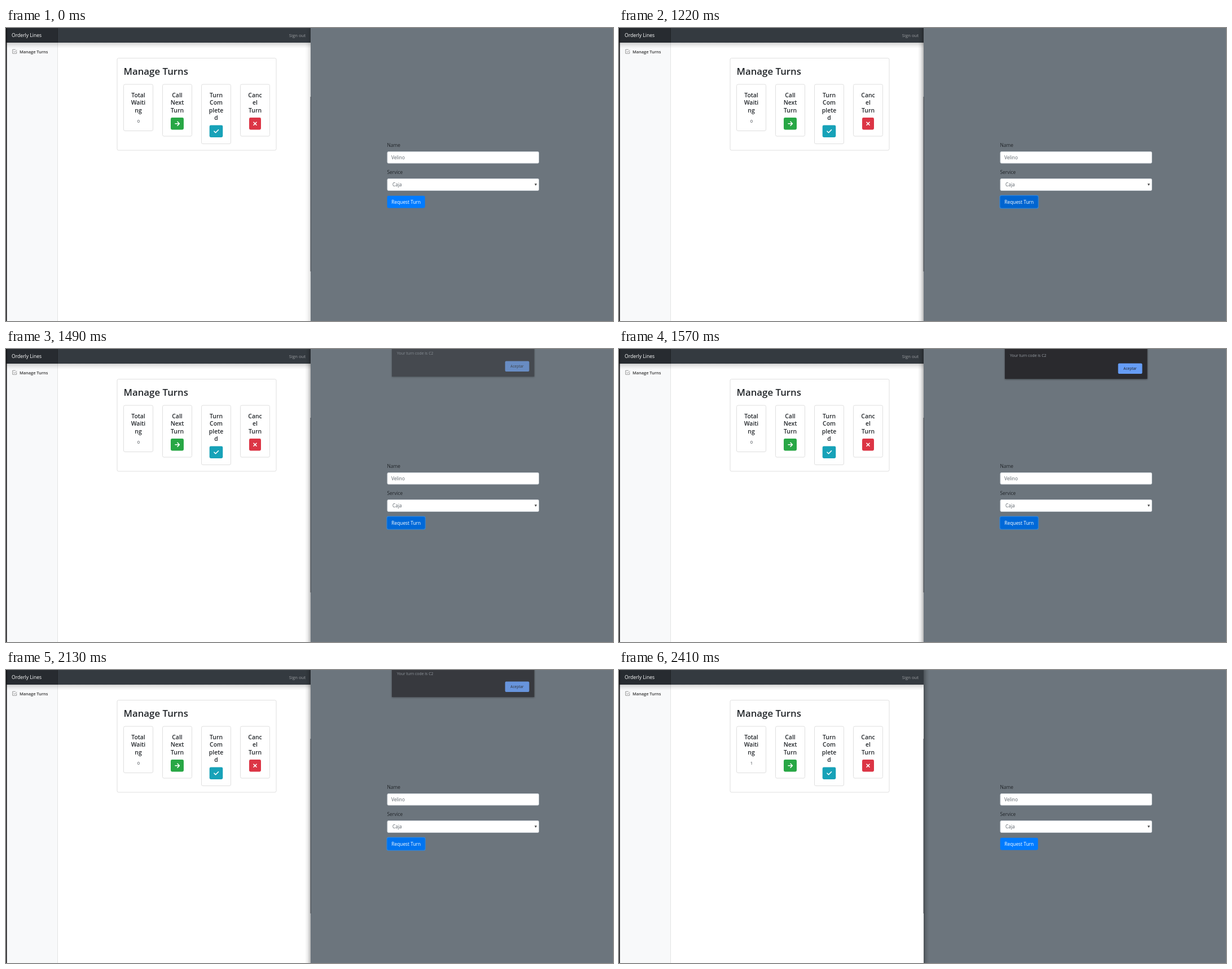
An HTML page that plays this animation: 1076x520 px, repeating every 2.83 s.

```html
<!DOCTYPE html>
<html lang="en">
<head>
<meta charset="utf-8">
<title>Turn desk</title>
<style>
  html, body { margin: 0; width: 100%; height: 100%; overflow: hidden; background: #6c757d; }
  svg { display: block; font: 8.4px "Open Sans", "Noto Sans", sans-serif; }
  .card { fill: #fff; stroke: #dfdfdf; }
  .title { font-size: 10.4px; font-weight: 600; fill: #212529; }
  .mid { text-anchor: middle; }
  .icon { fill: none; stroke: #fff; stroke-width: 1.6; stroke-linecap: round; stroke-linejoin: round; }
  .field { fill: #fff; stroke: #ced4da; }
  .label { fill: #212529; }
  .value { fill: #5b636a; }
</style>
</head>
<body>
<svg width="1076" height="520" viewBox="0 0 1076 520">
  <defs>
    <linearGradient id="navShade" x2="0" y2="1">
      <stop stop-opacity=".17"/><stop offset=".5" stop-opacity=".07"/><stop offset="1" stop-opacity="0"/>
    </linearGradient>
    <linearGradient id="toLeft" x1="1" x2="0">
      <stop stop-opacity=".28"/><stop offset=".5" stop-opacity=".08"/><stop offset="1" stop-opacity="0"/>
    </linearGradient>
    <linearGradient id="toRight">
      <stop stop-opacity=".3"/><stop offset=".5" stop-opacity=".1"/><stop offset="1" stop-opacity="0"/>
    </linearGradient>
    <filter id="drop" x="-5%" y="-20%" width="110%" height="150%">
      <feDropShadow dx="0" dy="1" stdDeviation="1.5" flood-opacity=".45"/>
    </filter>
  </defs>

  <!-- Desk window -->
  <rect width="540" height="520" fill="#fff"/>
  <rect y="26" width="91" height="494" fill="#f8f9fa"/>
  <rect x="91" y="26" width="1" height="494" fill="#e2e3e4"/>
  <rect y="26" width="540" height="10" fill="url(#navShade)"/>
  <rect width="540" height="26" fill="#343a40"/>
  <rect width="92" height="26" fill="#272b30"/>
  <rect x="91" width="1" height="26" fill="#202428"/>
  <rect width="1.5" height="520" fill="#0b0b0c"/>
  <text x="10" y="16.3" font-size="8.6" fill="#fff">Orderly Lines</text>
  <text x="531" y="16.3" font-size="7.7" fill="#9a9da0" text-anchor="end">Sign out</text>
  <path d="M18.7 41.5v3.7h-7v-7h5.2M13.5 41.3l1.8 1.8 4-4.2" fill="none" stroke="#8c8c8c" stroke-width=".9"/>
  <text x="24" y="44.5" font-size="7.4" font-weight="600" fill="#333">Manage Turns</text>
  <rect class="card" x="197" y="53.5" width="282" height="163.5" rx="2.5"/>
  <text x="208.5" y="83" font-size="16.8" font-weight="600" fill="#212529">Manage Turns</text>
  <g id="cards"></g>
  <text id="count" class="mid" x="235" y="167.8" font-size="7.5" fill="#343a40">0</text>

  <!-- Request window -->
  <rect x="540" width="536" height="520" fill="#6c757d"/>
  <rect id="shadeLeft" x="530" width="10" height="520" fill="url(#toLeft)"/>
  <rect id="shadeRight" x="540" width="10" height="520" fill="url(#toRight)"/>
  <rect x="539.6" y="122" width="1" height="310" fill="#3b4046"/>
  <text class="label" x="675.5" y="211">Name</text>
  <rect class="field" x="676" y="219.5" width="268.5" height="20.5" rx="2"/>
  <text class="value" x="683" y="233">Velino</text>
  <text class="label" x="675.5" y="259.4">Service</text>
  <rect class="field" x="676" y="267.5" width="268.5" height="21" rx="2"/>
  <text class="value" x="685" y="281.4">Caja</text>
  <path d="M936.9 276.3h4.2l-2.1 3.6z" fill="#444"/>
  <rect id="ring" x="675.2" y="297.2" width="68" height="22.8" rx="2.8" fill="none" stroke="#2f86dc" stroke-width="1.4"/>
  <rect id="request" x="675.7" y="297.7" width="67" height="21.8" rx="2.4"/>
  <text class="mid" x="709.2" y="311.7" fill="#fff">Request Turn</text>

  <g id="dialog">
    <path d="M684-20h252.5v73h-252.5z" fill="#292a2d" filter="url(#drop)"/>
    <text x="693" y="14" font-size="6.9" fill="#9aa0a6">Your turn code is C2</text>
    <rect x="884.7" y="25.5" width="42.8" height="18.5" rx="2" fill="#669df6"/>
    <text class="mid" x="906" y="37" font-size="6.5" fill="#202124">Aceptar</text>
  </g>
</svg>
<script>
const LOOP = 2830;
const el = id => document.getElementById(id);

// x, height, title lines, button [x, y, width, colour], icon path
const cards = [
  [208.5, 82.5, "Total Waiti ng"],
  [277.5, 92, "Call Next Turn", [292, 159, 23, "#28a745"], "M300 169.7h7M304 166.2l3.4 3.5-3.4 3.5"],
  [346.5, 105.5, "Turn Com plete d", [360.7, 172.5, 23.6, "#17a2b8"], "M369 183.2l2.5 2.5 5-5"],
  [415.5, 92, "Canc el Turn", [431, 159, 21, "#dc3545"], "M439 167.2l5 5M444 167.2l-5 5"]
];
el("cards").innerHTML = cards.map(([x, h, title, btn, icon]) =>
  `<rect class="card" x="${x}" y="100" width="52" height="${h}" rx="2.5"/>` +
  title.split(" ").map((line, i) =>
    `<text class="title mid" x="${x + 26}" y="${122.8 + i * 13.4}">${line}</text>`).join("") +
  (btn ? `<rect x="${btn[0]}" y="${btn[1]}" width="${btn[2]}" height="21.5" rx="2.4" fill="${btn[3]}"/>
    <path class="icon" d="${icon}"/>` : "")
).join("");

// Each track is [time, value] pairs; a value holds until the next time.
const hover = [[0, 0], [730, .15], [770, .6], [820, 1], [1050, 1.2], [1440, 1], [2130, .4], [2180, .1], [2220, 0]];
const alpha = [[0, 0], [1440, .27], [1485, .58], [1530, .85], [1570, 1], [2130, .79], [2180, .25], [2220, 0]];
const lift = [[0, 0], [1440, -7], [1485, -4], [1530, -1.5], [1570, 0], [2130, -5], [2180, -8]];
const leftShade = [[0, .5], [1050, 1], [2370, 0]];
const at = (track, t) => track.findLast(([start]) => start <= t)[1];

function draw(now) {
  const t = now % LOOP;
  const k = at(hover, t);
  const late = t >= 2370;
  el("request").setAttribute("fill", `rgb(0 ${123 - 18 * k} ${255 - 38 * k})`);
  el("ring").setAttribute("opacity", t >= 1050 && !late ? 1 : 0);
  el("shadeLeft").setAttribute("opacity", at(leftShade, t));
  el("shadeRight").setAttribute("opacity", late ? 1 : 0);
  el("dialog").setAttribute("opacity", at(alpha, t));
  el("dialog").setAttribute("transform", `translate(0 ${at(lift, t)})`);
  el("count").textContent = late ? 1 : 0;
}

const start = performance.now();
function tick() {
  draw(performance.now() - start);
  requestAnimationFrame(tick);
}
tick();
</script>
</body>
</html>
```
